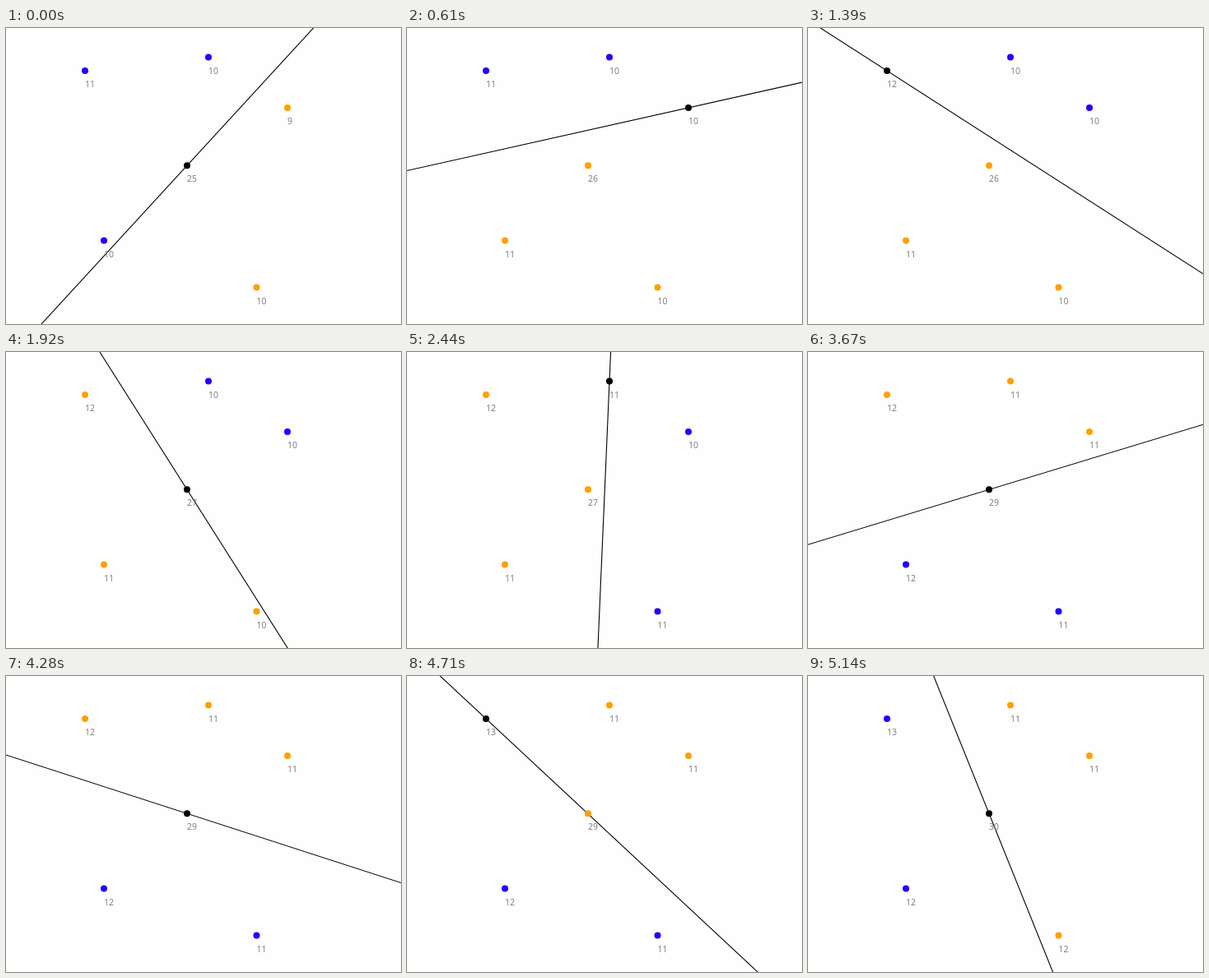
These frames come from a looping animation (480 px wide and 360 px high, 5240 ms). An HTML page with a canvas:

```html
<!DOCTYPE html>
<html lang="en">
<head>
<meta charset="utf-8">
<title>Windmill</title>
<style>
  html, body { margin: 0; width: 100%; height: 100%; overflow: hidden; background: #fefefe; }
  canvas { display: block; }
</style>
</head>
<body>
<canvas id="stage" width="480" height="360"></canvas>
<script>
const ctx = document.getElementById('stage').getContext('2d');
const LOOP = 5240;
const STEPS = 60;

const points = {
  A: { x: 96, y: 52, hits: 11 },
  B: { x: 246, y: 35.5, hits: 10 },
  C: { x: 342, y: 97, hits: 9 },
  D: { x: 220, y: 167.3, hits: 25 },
  E: { x: 119, y: 258.5, hits: 10 },
  F: { x: 304.5, y: 315.5, hits: 10 }
};

// Line angle in degrees (counter-clockwise from the right) at some steps.
const poses = [[0, 47.45], [7, 12.61], [16, -32.73], [28, -92.48],
               [42, -163.08], [49, -197.95], [59, -248.08]];

// Steps that last 80 ms; the others last 90 ms.
const shortSteps = new Set([0, 4, 8, 11, 15, 22, 25, 27, 31, 36, 41, 43, 45, 50, 52, 55, 57]);

// Each pivot hands over when the turning line meets the next point.
const handovers = [];
let pivot = 'D', turn = poses[0][1];
for (const next of 'EDCADFBDECDAFD') {
  const p = points[pivot], q = points[next];
  const pair = Math.atan2(p.y - q.y, q.x - p.x) * 180 / Math.PI;
  turn = pair + 180 * Math.floor((turn - pair) / 180 + 1e-6);
  handovers.push({ angle: turn, next });
  pivot = next;
}

function stepAt(time) {
  let step = 0, end = 0;
  while (step < STEPS - 1) {
    end += shortSteps.has(step) ? 80 : 90;
    if (time < end) break;
    step++;
  }
  return step;
}

function angleAt(step) {
  const i = Math.max(1, poses.findIndex(([s]) => s >= step));
  const [s0, a0] = poses[i - 1], [s1, a1] = poses[i];
  return a0 + (a1 - a0) * (step - s0) / (s1 - s0);
}

function draw(step) {
  const angle = angleAt(step);
  const dx = Math.cos(angle * Math.PI / 180);
  const dy = -Math.sin(angle * Math.PI / 180);
  const done = handovers.filter(h => h.angle >= angle);
  const current = done.length ? done[done.length - 1].next : 'D';
  const center = points[current];

  ctx.fillStyle = '#fefefe';
  ctx.fillRect(0, 0, 480, 360);

  ctx.strokeStyle = '#000';
  ctx.lineWidth = 1.1;
  ctx.beginPath();
  ctx.moveTo(center.x - 700 * dx, center.y - 700 * dy);
  ctx.lineTo(center.x + 700 * dx, center.y + 700 * dy);
  ctx.stroke();

  ctx.font = '500 10.5px "Noto Sans", sans-serif';
  for (const [name, p] of Object.entries(points)) {
    const side = dx * (p.y - center.y) - dy * (p.x - center.x);
    ctx.fillStyle = name === current ? '#000' : side < 0 ? '#2100ff' : '#ffa000';
    ctx.beginPath();
    ctx.arc(p.x, p.y, 4, 0, 2 * Math.PI);
    ctx.fill();

    ctx.fillStyle = '#808080';
    const hits = p.hits + done.filter(h => h.next === name).length;
    ctx.fillText(hits, p.x, p.y + 20);
  }
}

function tick() {
  draw(stepAt(performance.now() % LOOP));
  requestAnimationFrame(tick);
}
tick();
</script>
</body>
</html>
```
